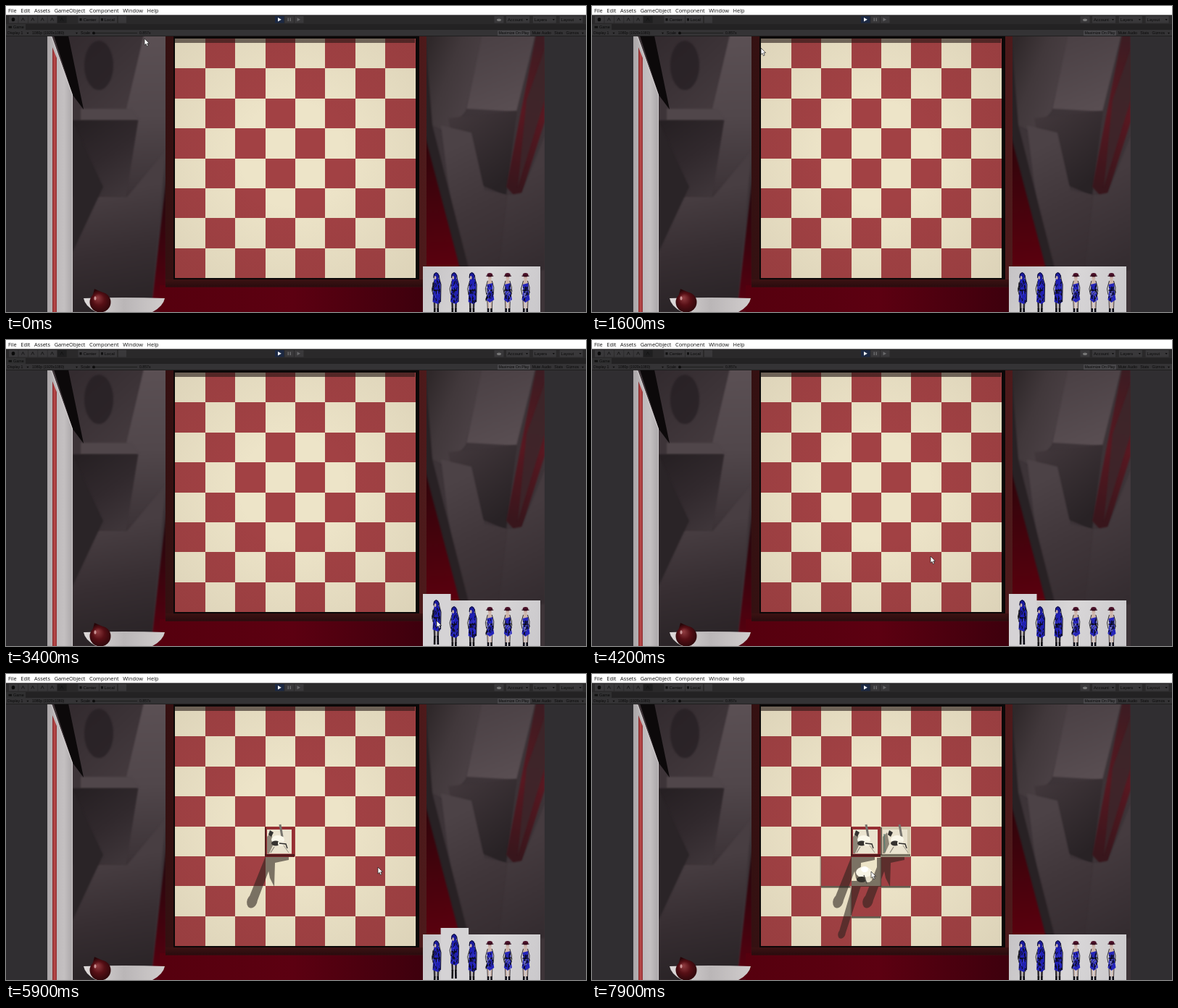
Animation of 800 by 423 pixels, one loop 8 s. Source, as an HTML page with a canvas:

```html
<!DOCTYPE html>
<html lang="en">
<head>
<meta charset="utf-8">
<title>Board game in an editor</title>
<style>
html, body { margin: 0; width: 100%; height: 100%; overflow: hidden; background: #302e31; }
canvas { display: block; }
</style>
</head>
<body>
<canvas id="stage" width="800" height="423"></canvas>
<script>
const LOOP = 8000, STEP = 100, W = 800, H = 423;
const CELL = 41.4, BX = 233.4, BY = 45;
const INK = '#0a0a14', EDGE = '#39383a', DARK = '#0a0a0a';
const stage = document.getElementById('stage').getContext('2d');
let g = stage;

const colX = c => Math.round(BX + c * CELL);
const rowY = r => Math.round(BY + r * CELL);

function rect(x, y, w, h, fill) {
  g.fillStyle = fill;
  g.fillRect(x, y, w, h);
}
function trace(...p) {
  g.moveTo(p[0], p[1]);
  for (let i = 2; i < p.length; i += 2) g.lineTo(p[i], p[i + 1]);
  g.closePath();
}
function poly(fill, ...p) {
  g.beginPath();
  trace(...p);
  g.fillStyle = fill;
  g.fill();
}
function oval(x, y, rx, ry, fill) {
  g.beginPath();
  g.ellipse(x, y, rx, ry, 0, 0, Math.PI * 2);
  g.fillStyle = fill;
  g.fill();
}
function line(color, width, ...p) {
  g.beginPath();
  for (let i = 0; i < p.length; i += 2) g.lineTo(p[i], p[i + 1]);
  g.strokeStyle = color;
  g.lineWidth = width;
  g.stroke();
}
function grad(x0, y0, x1, y1, ...colors) {
  const f = g.createLinearGradient(x0, y0, x1, y1);
  colors.forEach((c, i) => f.addColorStop(i / (colors.length - 1), c));
  return f;
}
// Draws a word and returns the x where it ends.
function label(s, x, y, size = 5.2, color = DARK, font = '"Liberation Sans", Arial, sans-serif') {
  g.font = size + 'px ' + font;
  g.fillStyle = color;
  g.fillText(s, x, y);
  return x + g.measureText(s).width;
}
function arrow(x, y) {
  poly(DARK, x, y, x + 3, y, x + 1.5, y + 2);
}

function drawEditor() {
  rect(0, 0, W, 12.5, '#fff');
  rect(0, 12.5, W, 12.5, '#2a292a');
  rect(0, 25, W, 8, '#232223');
  rect(0, 25, 27, 8, '#303031');
  rect(0, 33, W, 8.5, '#343335');
  rect(0, 41, W, .8, '#1b1b1b');
  let x = 3;
  for (const s of ['File', 'Edit', 'Assets', 'GameObject', 'Component', 'Window', 'Help'])
    x = label(s, x, 9.2, 7.35, '#111', '"Open Sans", "Noto Sans", sans-serif') + 5.7;

  for (let i = 0; i < 6; i++) {
    const bx = 4 + i * 13.4;
    rect(bx, 14, 12.6, 9.5, i === 5 ? '#1e1e1f' : EDGE);
    if (i) line('#111', .8, bx + 4, 20.5, bx + 6, 16.5, bx + 8, 20.5);
    else oval(bx + 6, 18.7, 2.3, 2.6, DARK);
  }
  rect(99.5, 14, 28.5, 9.5, EDGE);
  rect(129, 14, 24, 9.5, EDGE);
  rect(155, 14, 11, 9.5, EDGE);
  rect(101.5, 17, 3, 3.5, '#111');
  rect(131, 17, 3, 3.5, '#111');
  label('Center', 106.5, 20.8, 6);
  label('Local', 135.5, 20.8, 6);

  for (let i = 0; i < 3; i++) rect(371 + i * 13.5, 14, 12.5, 9.5, i ? EDGE : '#1c2943');
  poly('#f2f5fa', 375, 16, 375, 21.5, 379.8, 18.7);
  rect(388.5, 16.5, 1.5, 4.5, '#68686a');
  rect(391.5, 16.5, 1.5, 4.5, '#68686a');
  poly('#68686a', 401.5, 16.3, 401.5, 21.2, 406, 18.7);

  rect(673.5, 14, 13, 9.5, EDGE);
  oval(680, 19.3, 3, 1.8, '#777');
  ['Account', 'Layers', 'Layout'].forEach((s, i) => {
    const bx = 690 + i * 36.8;
    rect(bx, 14, 32, 9.5, EDGE);
    label(s, bx + 2, 20.8, 5.8);
    arrow(bx + 27, 18);
  });
  rect(3.5, 27.8, 4.5, 2.8, '#111');
  label('Game', 10, 31.1, 5.4);
  label('Display 1', 2, 39.2);
  arrow(28.5, 36.7);
  label('1080p (1920x1080)', 36, 39.2, 5.1);
  arrow(96, 36.7);
  label('Scale', 103, 39.2);
  line('#171717', .8, 119, 37.4, 181, 37.4);
  oval(121, 37.4, 1.9, 1.9, '#0c0c0c');
  label('0.857x', 184, 39.2);
  rect(678, 34, 45, 7, '#48474a');
  x = 679.5;
  for (const s of ['Maximize On Play', 'Mute Audio', 'Stats', 'Gizmos']) x = label(s, x, 39.2) + 4.4;
  arrow(794, 36.7);
}

function drawBlocks() {
  rect(57, 41, 686, 382, '#3d3438');
  g.filter = 'blur(1.3px)';
  // left
  poly(grad(95, 42, 185, 140, '#332b2f', '#453b3f'), 85, 40, 190, 40, 168, 143, 107, 143);
  oval(128, 82, 20, 34, 'rgba(38,31,35,.75)');
  poly(grad(180, 42, 190, 262, '#5b5054', '#51474b', '#3b3236'), 190, 40, 236, 40, 218, 235, 165, 264, 182, 158, 166, 142);
  poly('#50464a', 103, 142, 172, 142, 184, 158, 103, 158);
  poly(grad(100, 160, 170, 262, '#262023', '#31292d', '#40373b'), 92, 158, 182, 158, 165, 264, 92, 264);
  poly(grad(120, 262, 150, 423, '#483e42', '#372e32', '#292326'), 92, 264, 167, 264, 220, 200, 200, 423, 92, 423);
  poly('#2a2427', 92, 160, 134, 250, 92, 340);
  poly(grad(221, 240, 203, 423, '#20080c', '#5a0010'), 221, 238, 221, 423, 200, 423);
  // right
  poly(grad(580, 60, 655, 90, '#2f282a', '#41383b', '#4a4044'), 578, 40, 660, 40, 634, 145, 610, 175, 578, 160);
  poly(grad(650, 42, 690, 145, '#4a4044', '#594e52'), 657, 40, 730, 40, 704, 146, 635, 142);
  poly(grad(620, 150, 690, 240, '#41373b', '#282225'), 610, 155, 705, 145, 690, 262, 625, 235);
  poly(grad(610, 200, 690, 360, '#4c4246', '#40363a', '#362d31'), 600, 165, 642, 175, 660, 255, 696, 262, 690, 372, 625, 365);
  poly(grad(740, 45, 695, 250, '#3c1c22', '#591821', '#38161c'), 731, 40, 743, 40, 743, 160, 708, 270, 690, 250);
  poly('rgba(58,40,44,.8)', 743, 60, 743, 130, 706, 250, 718, 130);
  poly(grad(680, 250, 735, 360, '#453b3f', '#342c30'), 692, 262, 712, 258, 743, 180, 743, 365, 680, 365);
  poly('#282124', 578, 40, 588, 165, 640, 370, 624, 370, 578, 210);
  poly(grad(580, 190, 610, 400, '#30050b', '#64000f'), 578, 180, 628, 370, 628, 423, 578, 423);
  g.filter = 'none';
}
function drawRoom() {
  drawBlocks();
  rect(212, 386, 366, 37, grad(212, 0, 578, 0, '#56000e', '#5c0011', '#3d000d'));
  // wall panel and its beam
  poly('#0c090a', 66, 41, 86, 41, 107, 143, 92, 123);
  poly(grad(57, 0, 92, 0, '#a9a5a7', '#bdb9bb', '#c4c0c1', '#aaa6a8'), 57, 41, 63, 41, 92, 123, 92, 423, 57, 423);
  poly(grad(64, 0, 70, 0, '#852a2c', '#bd4b4b', '#8d3033'), 64, 57, 70, 72, 70, 423, 64, 423);
  line('#dcd7d8', .8, 63, 43, 91.5, 123, 91.5, 423);
  // bowl and drop
  g.beginPath();
  g.moveTo(107, 404);
  g.quadraticCurveTo(163, 402, 219, 404);
  g.quadraticCurveTo(217, 415, 202, 423);
  g.lineTo(124, 423);
  g.quadraticCurveTo(109, 415, 107, 404);
  g.fillStyle = grad(107, 0, 219, 0, '#dedada', '#bab6b7', '#d0cccc');
  g.fill();
  const red = g.createRadialGradient(126, 403, 1, 130, 409, 17);
  red.addColorStop(0, '#8d3a3e');
  red.addColorStop(.45, '#560f15');
  red.addColorStop(1, '#260508');
  poly(red, 122, 391, 138, 398, 119, 402);
  oval(130, 409.5, 14.5, 14, red);
  oval(123, 404, 1.6, 2.8, 'rgba(255,215,215,.6)');
}

function drawBoard() {
  rect(220, 41.5, 360, 347, grad(220, 0, 580, 0, '#341011', '#451719', '#3e1213', '#4d1a1b'));
  rect(220, 378, 360, 10.5, grad(0, 378, 0, 389, '#3c1213', '#280b0d'));
  rect(231, 41.5, 339, 336.5, '#0b0808');
  for (let r = 0; r < 8; r++) for (let c = 0; c < 8; c++)
    rect(colX(c), rowY(r), colX(c + 1) - colX(c), rowY(r + 1) - rowY(r), (r + c) % 2 ? '#a24144' : '#ede4c8');
  rect(colX(0), BY, 331, 6, 'rgba(35,22,20,.6)');
  const light = g.createRadialGradient(395, 205, 70, 395, 205, 245);
  light.addColorStop(0, 'rgba(45,30,20,0)');
  light.addColorStop(1, 'rgba(45,30,20,.09)');
  rect(colX(0), BY, 331, 331, light);
}

function scribble(seed, x, y, w, h, color, n) {
  let s = seed;
  const rnd = () => (s = (s * 16807) % 2147483647) / 2147483647;
  rnd();
  for (let i = 0; i < n; i++) {
    const px = x + rnd() * w, py = y + rnd() * h;
    line(color, 1, px, py, px + rnd() * 3 - 1.5, py + 2 + rnd() * 3);
  }
}
function figure(i, x, y) {
  const hooded = i < 3, skin = '#cdb5aa', seed = 977 + i * 4099;
  g.save();
  g.translate(x, y);
  for (const side of [-1, 1]) {
    line(hooded ? '#3a3437' : skin, 2.2, side * 2.3, 38, side * 2, 50);
    line(INK, .7, side * 3.5, 38, side * 3, 50);
    line(INK, 2.6, side * 2.2, 49, side * 2.4, 61);
  }
  if (hooded) {
    poly('#2020b4', -3, 8, 4, 8, 6, 14, 6, 40, 2, 43, -5, 40, -4, 20);
    oval(0, 4.5, 3.8, 5.2, '#1a1a9c');
    oval(-1.5, 6.5, 1.4, 2.5, skin);
    line(INK, .9, -3.6, 7, -3, 1.5, 0, -.5, 3.6, 3, 4.5, 9, 6.5, 16, 6, 40);
  } else {
    poly(skin, -3, 10, 3, 10, 4.5, 18, -4, 18);
    poly('#2525ba', -4, 16, 4, 14, 4, 24, 6, 37, 0, 41, -5, 37, -3, 24);
    oval(0, 6.5, 2.4, 3.6, skin);
    oval(0, 2.8, 3.8, 2.8, '#4a1128');
    line('#2b0a18', 1.2, -5, 4.2, 5, 4.2);
    line(INK, .8, 3, 11, 5.5, 20, 5, 30);
  }
  line(INK, .8, -3, 11, -6, 22, -4.5, 30);
  line(INK, 1.4, -4, 24, 4, 24);
  scribble(seed, -4.5, hooded ? 10 : 16, 9.5, hooded ? 28 : 20, INK, hooded ? 30 : 20);
  scribble(seed + 31, -4, 16, 8, 20, hooded ? '#3a3ad8' : '#7a7ad2', 6);
  g.restore();
}
function drawCards(up) {
  const gap = 24.6;
  rect(575, 360, 162, 63, grad(575, 360, 737, 423, '#c5c3c5', '#d9d7d8', '#cac8cb'));
  if (up >= 0) rect(575 + up * gap, 351, 38.5, 72, '#d5d3d5');
  for (let i = 0; i < 6; i++) figure(i, 593.5 + i * gap, i === up ? 360 : 369);
}

// A leaning shadow: a tapered stem with a rounded head.
function shadow(x, y, w, dx, dy, head) {
  trace(x, y, x + w, y, x + dx + head * 1.5, y + dy, x + dx - head * .4, y + dy);
  g.moveTo(x + dx + head * 1.5, y + dy);
  g.ellipse(x + dx + head * .5, y + dy, head, head * 1.4, .35, 0, Math.PI * 2);
}
function raised(c, r) {
  rect(colX(c), rowY(r + 1), CELL - 1, 2.6, 'rgba(48,42,34,.72)');
  rect(colX(c) - 1.5, rowY(r), 1.8, CELL, 'rgba(48,34,30,.4)');
}
const PLACES = [[3, 4], [4, 4], [3, 5]];
function drawPieces(count, near) {
  if (!count) return;
  if (near) {
    const [c, r] = PLACES[count - 1];
    [[-1, 0], [1, 0], [0, -1], [0, 1]].forEach(([u, v]) => {
      const taken = PLACES.slice(0, count).some(p => p[0] === c + u && p[1] === r + v);
      if (!taken) raised(c + u, r + v);
    });
  }
  g.beginPath();
  for (let i = 0; i < Math.min(count, 2); i++) {
    const x = colX(3 + i);
    shadow(x, 252, 12, -22, 62, 7);
    trace(x, 252, x + 32, 252, x + 32, 257, x + 13, 261, x + 12, 294, x + 6, 282);
  }
  if (count > 2) {
    shadow(360, 290, 12, -18, 69, 5);
    trace(393, 254, 399, 254, 399, 294, 358, 294, 358, 286, 393, 286);
  }
  g.fillStyle = 'rgba(42,34,28,.58)';
  g.fill();
  for (let i = 0; i < Math.min(count, 2); i++) drawKnight(i);
  if (count > 2) drawThird();
}
function drawKnight(i) {
  g.save();
  g.translate(colX(3 + i), 211);
  rect(-1, 0, 41, 42, i ? '#d3cab0' : '#962f33');
  rect(-1, 38, 41, 3.5, i ? '#767060' : '#55191d');
  rect(-1, 1, 2, 38, 'rgba(45,25,22,.6)');
  rect(2, 4, 34, 33.5, '#eae3cf');
  poly('rgba(90,84,72,.65)', 2, 14, 8, 8, 11, 24, 5, 37, 2, 37);
  if (i) line('#56786b', 1.2, 4, 10, 5, 35);
  g.translate(i * 5, 0);
  poly('#343331', 6, 5, 11, 8, 8, 14, 4, 11);
  line('#77746e', 3, 20, -3, 23, 14);
  oval(17, 18, 9, 6, '#fbf8eb');
  oval(14, 23, 6, 3.5, '#35322f');
  oval(21, 23, 4, 4, '#f5f0e0');
  line('#302e2c', 1.4, 19, 23, 28, 24, 30, 30);
  line('#8a8479', 1.3, 12, 28, 7, 36);
  line('#9b9488', 1, 25, 26, 32, 36);
  g.restore();
}
function drawThird() {
  oval(375, 274, 11, 7.5, '#f8f4e5');
  oval(372, 284, 7, 4, '#35322d');
  oval(381, 284, 4, 4, '#e6dfcb');
  line('#52504a', 1.3, 375, 278, 379, 290);
  oval(376, 270, 5, 4, '#fff');
}

function makeScene() {
  const c = document.createElement('canvas');
  c.width = W;
  c.height = H;
  g = c.getContext('2d');
  drawRoom();
  rect(0, 41, 57, 382, '#302e31');
  rect(743, 41, 57, 382, '#302e31');
  drawBoard();
  drawEditor();
  g = stage;
  return c;
}

// Cursor stops: time, x, y
const PATH = [[0, 191, 45], [300, 191, 45], [900, 197, 46], [1600, 233, 58], [2500, 757, 238],
  [2700, 758, 239], [3400, 594, 388], [3700, 594, 388], [4200, 467, 299], [4600, 378, 231],
  [5400, 618, 390], [5900, 513, 267], [6300, 421, 232], [7000, 672, 356], [7300, 694, 392],
  [7900, 385, 273], [LOOP, 385, 273]];
function cursorAt(t) {
  const i = PATH.findIndex(p => p[0] > t);
  const [a, x, y] = PATH[i - 1], [b, u, v] = PATH[i];
  const k = (t - a) / (b - a);
  return [x + (u - x) * k, y + (v - y) * k];
}
function drawCursor(x, y) {
  g.save();
  g.translate(x, y);
  poly('#fff', 0, 0, 0, 9.2, 2.1, 7.3, 3.5, 10.8, 5.2, 10, 3.8, 6.7, 6.6, 6.7);
  g.strokeStyle = '#111';
  g.lineWidth = .65;
  g.stroke();
  g.restore();
}

const scene = makeScene();
function render(now) {
  const t = Math.floor((now % LOOP) / STEP) * STEP;
  const within = (a, b) => t >= a && t < b;
  const count = [4700, 6400, 7900].filter(p => t >= p).length;
  const up = within(3400, 4700) ? 0 : within(5200, 6400) ? 1 : within(7200, 7900) ? 4 : -1;
  g.drawImage(scene, 0, 0);
  drawPieces(count, up < 0);
  drawCards(up);
  drawCursor(...cursorAt(t));
}
const start = performance.now();
function tick() {
  render(performance.now() - start);
  requestAnimationFrame(tick);
}
tick();
</script>
</body>
</html>
```
